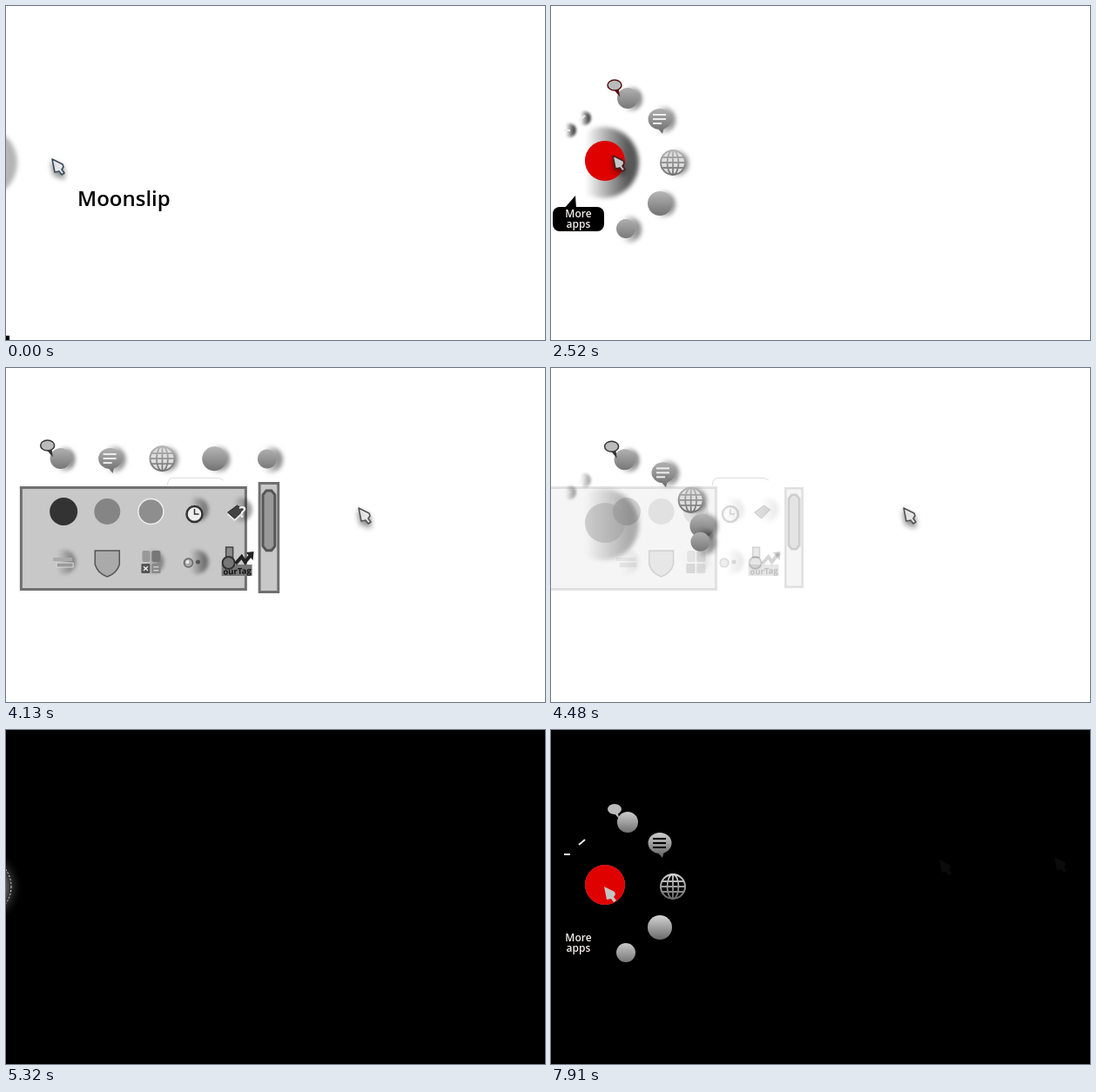
An HTML page with a canvas that plays this animation: 619x384 px, repeating every 8 s.

```html
<!DOCTYPE html>
<html>
<head>
<meta charset="utf-8">
<style>
html, body { margin: 0; width: 100%; height: 100%; overflow: hidden; background: #fff; }
canvas { display: block; }
</style>
</head>
<body>
<canvas id="stage" width="619" height="384"></canvas>
<script>
const ctx = document.getElementById('stage').getContext('2d');
const LOOP = 8000, STEP = 70, TAU = Math.PI * 2;
const FONT = '"Open Sans", sans-serif';

const clamp = v => Math.max(0, Math.min(1, v));
const lerp = (a, b, p) => a + (b - a) * p;
const smooth = p => p * p * (3 - 2 * p);

// Cursor keys: time, x, y
const LIGHT_PATH = [[0, 52, 175], [910, 52, 175], [1190, 14, 180], [1680, 14, 181], [1960, 60, 179],
  [2170, 60, 179], [2380, 70, 171], [2520, 70, 171], [3080, 79, 169], [3290, 79, 169],
  [4060, 376, 163], [4130, 404, 160], [4620, 404, 160], [5110, 505, 170]];
const DARK_PATH = [[6090, 577, 145], [6160, 445, 148], [6230, 340, 168], [6300, 252, 180],
  [6370, 160, 184], [6580, 56, 188], [6860, 30, 189], [7070, 18, 189], [7210, 18, 189], [7910, 60, 179]];

function along(path, t) {
  let i = 1;
  while (i < path.length - 1 && path[i][0] < t) i++;
  const [t0, x0, y0] = path[i - 1], [t1, x1, y1] = path[i];
  const p = clamp((t - t0) / (t1 - t0));
  return [lerp(x0, x1, p), lerp(y0, y1, p)];
}

function at(x, y, alpha, draw, scale = 1) {
  if (alpha <= 0 || scale <= 0) return;
  ctx.save();
  ctx.translate(x, y);
  ctx.scale(scale, scale);
  ctx.globalAlpha *= Math.min(1, alpha);
  draw();
  ctx.restore();
}

function paint(fill, stroke, width = 1) {
  if (fill) { ctx.fillStyle = fill; ctx.fill(); }
  if (stroke) { ctx.strokeStyle = stroke; ctx.lineWidth = width; ctx.stroke(); }
}

function disc(x, y, r, fill, stroke, width) {
  ctx.beginPath();
  ctx.arc(x, y, r, 0, TAU);
  paint(fill, stroke, width);
}

function poly(points, fill, stroke, width, open) {
  ctx.beginPath();
  points.forEach(([x, y]) => ctx.lineTo(x, y));
  if (!open) ctx.closePath();
  paint(fill, stroke, width);
}

function box(x, y, w, h, r, fill, stroke, width) {
  ctx.beginPath();
  ctx.roundRect(x, y, w, h, r);
  paint(fill, stroke, width);
}

function text(str, x, y, font, color, align = 'center') {
  ctx.font = font + ' ' + FONT;
  ctx.fillStyle = color;
  ctx.textAlign = align;
  ctx.fillText(str, x, y);
}

function shade(r, top, bottom) {
  const g = ctx.createLinearGradient(0, -r, 0, r);
  g.addColorStop(0, top);
  g.addColorStop(1, bottom);
  return g;
}

// Blurred disc that fades out towards its left side
function sideShadow(x, y, r, alpha) {
  const g = ctx.createLinearGradient(x - r * 0.5, 0, x + r * 0.7, 0);
  g.addColorStop(0, 'rgba(0,0,0,0)');
  g.addColorStop(1, `rgba(0,0,0,${alpha})`);
  ctx.save();
  ctx.filter = `blur(${Math.min(2.5, r / 6)}px)`;
  disc(x, y, r, g);
  ctx.restore();
}

function wheelIcons(dark, ink) {
  const metal = dark ? shade(15, '#d8d8d8', '#666') : shade(15, '#b8b8b8', '#707070');
  const shadow = r => dark || sideShadow(3, 1, r, 0.45);
  return [
    { x: 88, y: 106, rowX: 53, draw() {
      shadow(14);
      disc(0, 0, 12, metal);
      ctx.beginPath();
      ctx.moveTo(-15, -10);
      ctx.lineTo(-10, -4);
      ctx.lineTo(-11, -11);
      paint(dark ? '#bbb' : ink, dark ? null : ink, 1.5);
      ctx.beginPath();
      ctx.ellipse(-15, -15, 8, 6, 0, 0, TAU);
      paint('#bbb', dark ? null : ink, 1.5);
    } },
    { x: 125, y: 130, rowX: 110, draw() {
      shadow(15);
      ctx.beginPath();
      ctx.ellipse(0, 0, 13.5, 12, 0, 0, TAU);
      paint(metal);
      poly([[-3, 10], [3, 17], [5, 9]], metal);
      ctx.fillStyle = dark ? '#000' : '#eee';
      for (const [y, w] of [[-6, 14], [-1, 14], [4, dark ? 14 : 9]]) ctx.fillRect(-8, y, w + 1, 2);
    } },
    { x: 140, y: 180, rowX: 170, draw() {
      shadow(15);
      disc(0, 0, 14, dark ? null : '#ddd', metal, 2);
      ctx.beginPath();
      ctx.ellipse(0, 0, 6.5, 14, 0, 0, TAU);
      for (const y of [-6, 0, 6]) {
        const half = Math.sqrt(196 - y * y);
        ctx.moveTo(-half, y);
        ctx.lineTo(half, y);
      }
      ctx.moveTo(0, -14);
      ctx.lineTo(0, 14);
      paint(null, metal, 1.8);
    } },
    { x: 125, y: 227, rowX: 230, draw() { shadow(15); disc(0, 0, 14, metal); } },
    { x: 86, y: 256, rowX: 291, draw() { shadow(15); disc(0, 0, 11, metal); } }
  ];
}

const panelIcons = [
  hot => disc(0, 0, 16, hot ? '#6a0c0c' : '#333'),
  () => disc(0, 0, 15, '#858585'),
  () => disc(0, 0, 14.5, '#8e8e8e', '#eee', 1.5),
  () => {
    sideShadow(2, -2, 14, 0.4);
    disc(0, 3, 9, '#eee', '#333', 2.5);
    poly([[0, -3], [0, 3], [5, 3]], null, '#333', 1.5, true);
  },
  () => {
    sideShadow(2, -2, 14, 0.4);
    poly([[-12, 1], [-1, -7], [6, -2], [-4, 8]], '#444', '#222', 1);
    poly([[-12, 3], [-4, 10], [5, 2]], null, '#eee', 1.5, true);
    text('?', 5, 7, 'bold 17px', '#eee');
  },
  () => {
    sideShadow(0, 0, 14, 0.35);
    box(-12, -5, 22, 4, 0, '#aaa');
    box(-8, 1, 19, 5, 0, '#999', '#ddd');
  },
  () => {
    ctx.beginPath();
    ctx.moveTo(-14, -13);
    ctx.lineTo(14, -13);
    ctx.lineTo(14, 3);
    ctx.quadraticCurveTo(11, 13, 0, 17);
    ctx.quadraticCurveTo(-11, 13, -14, 3);
    ctx.closePath();
    paint('#aaa', '#555', 1.5);
  },
  () => {
    sideShadow(2, 0, 13, 0.35);
    box(-10, -13, 9, 13, 2, '#999');
    box(1, -13, 10, 13, 2, '#777');
    box(-11, 2, 10, 11, 1, '#555');
    box(1, 2, 10, 11, 1, '#888');
    text('×', -6, 12, 'bold 13px', '#eee');
    box(3, 5, 6, 1.5, 0, '#ccc');
    box(3, 9, 6, 1.5, 0, '#ccc');
  },
  () => {
    sideShadow(2, 0, 14, 0.45);
    disc(-7, 1, 5, '#aaa', '#666', 1.5);
    disc(4, 0, 2.5, '#555');
    disc(-8, 0, 2, '#eee');
  },
  () => {
    box(-19, 3, 35, 13, 0, '#777');
    poly([[-14, -17], [-6, -17], [-6, -5], [-14, -5]], '#888', '#444', 1.5);
    disc(-11, 1, 7, '#777', '#333', 2);
    poly([[-3, 2], [4, -6], [8, 0], [16, -10]], null, '#222', 4, true);
    poly([[9, -11], [18, -12], [17, -2]], '#222');
    at(-1, 14, 1, () => { ctx.rotate(-0.04); text('ourTag', 0, 0, 'bold 9.5px', '#111'); });
  }
];

function panel(shown, hot) {
  const away = 1 - shown, alpha = 1.3 * shown;
  at(0, 0, alpha, () => {
    box(44.5 - 190 * away, 137.5, 248 + 70 * away, 117, 0, '#c8c8c8', '#707070', 3);
    panelIcons.forEach((draw, i) => {
      const x = lerp(62 + (i % 5) * 52.2, 166, away * 0.28);
      at(x, i < 5 ? 165 : 223, 1, () => draw(hot && i === 0));
    });
    at(306.5 - 32 * away, 195, 1, () => {
      box(-11, -63.5, 22, 127, 0, '#c8c8c8', '#707070', 3);
      poly([[-3, -55], [3, -55], [7, -50], [7, 10], [3, 15], [-3, 15], [-7, 10], [-7, -50]], '#999', '#555', 3);
    }, 1 - 0.12 * away);
  });
}

function wheel(open, shown, slide, hover, dark) {
  const cx = lerp(-28, 60, open), cy = 180, hub = 1 - 1.5 * shown;
  at(0, 0, hub, () => {
    if (!dark) sideShadow(cx, cy, 41, lerp(0.29, 0.66, open));
    else if (open < 1) {
      const g = ctx.createRadialGradient(cx, cy, 24, cx, cy, 48);
      g.addColorStop(0, `rgba(130,130,130,${1 - open})`);
      g.addColorStop(1, 'rgba(0,0,0,0)');
      disc(cx, cy, 48, g);
      ctx.save();
      ctx.globalAlpha *= 1 - open;
      ctx.setLineDash([2, 2]);
      disc(cx, cy, 34, null, '#ddd', 1);
      ctx.restore();
    }
    at(cx + 2, 178, open, () => {
      disc(0, 0, 23, '#999');
      ctx.globalAlpha *= hover;
      disc(0, 0, 23, '#df0000');
    }, open);
    if (!dark) for (const [x, y] of [[38, 129], [21, 143]])
      at(cx + (x - 60) * open, cy + (y - cy) * open, open, () => sideShadow(0, 0, 8, 0.75), open);
    const tools = [[[-45, -37], [-38, -37]], [[-28, -48], [-21, -54]]];
    at(cx, cy, open, () => tools.forEach(line => poly(line, null, '#eee', 2, true)), open);
  });
  const ink = hover > 0.5 && shown < 0.3 ? '#511' : '#333';
  for (const icon of wheelIcons(dark, ink)) {
    const x = cx + (icon.x - 60) * open, y = cy + (icon.y - cy) * open;
    at(lerp(x, icon.rowX, shown) + slide, lerp(y, 104, shown), open, icon.draw, open);
  }
  at(0, 0, hover * hub, () => {
    box(2, 231, 59, 28, 8, '#000');
    poly([[15, 233], [28, 218], [29, 233]], '#000');
    text('More', 31.5, 243, '600 12px', '#f6eeee');
    text('apps', 31.5, 255, '600 12px', '#f6eeee');
  });
}

function cursor(x, y, alpha, fill, line) {
  at(x, y, alpha, () => {
    if (line) {
      ctx.shadowColor = 'rgba(0,0,0,.45)';
      ctx.shadowBlur = 6;
      ctx.shadowOffsetY = 4;
    }
    ctx.lineJoin = 'round';
    poly([[1, 1], [13, 7], [14, 10], [12, 13], [15, 17], [12, 19], [9, 15], [4, 16]], fill, line, 1.6);
  });
}

function render(t) {
  const now = Math.floor(t / STEP) * STEP;
  const seg = (start, steps) => clamp(((now - start) / STEP + 1) / steps);
  const dark = now >= 5320;
  ctx.fillStyle = dark ? '#000' : '#fff';
  ctx.fillRect(0, 0, 619, 384);

  if (dark) {
    wheel(smooth(seg(7210, 11)), 0, 0, seg(7630, 5), true);
    if (now >= 6160) cursor(577, 145, 0.055, '#ccc');
    if (now >= 6230) cursor(445, 148, 0.055, '#ccc');
    if (now >= 6090) cursor(...along(DARK_PATH, now), 1, '#c4c4c4');
    return;
  }

  at(0, 0, t < 500 ? 1 : t < 560 ? 0.4 : 0, () => {
    text('Moonslip', 82, 230, '600 24px', '#000', 'left');
    ctx.fillRect(0, 379, 4, 5);
  });

  const rise = clamp((now - 2520) / 560), fall = seg(4130, 7);
  const row = smooth(rise) * (1 - fall ** 3);
  const slide = 85 * Math.sin(Math.PI * rise) + 22 * Math.sin(Math.PI * fall);
  const shown = smooth(rise) * (1 - fall);
  const open = smooth(seg(980, 10)) * (1 - smooth(seg(4690, 8)));
  const hover = now < 4130 ? seg(1750, 4) : 0;
  const hot = now >= 3010 && now < 3360;

  panel(shown, hot);
  wheel(open, row, slide, hover, false);
  if (hot) {
    box(30, 124, 64, 16, 8, '#000');
    text('Early Elfie', 62, 136, '600 11.5px', '#fff');
  }
  if (now >= 3710 && now < 4550) {
    ctx.beginPath();
    ctx.moveTo(185.5, 135);
    ctx.quadraticCurveTo(185.5, 126.5, 192, 126.5);
    ctx.lineTo(245, 126.5);
    ctx.lineTo(250, 129);
    paint(null, '#ddd');
  }

  const onHub = now >= 1960 && now <= 2590;
  const line = now < 1960 ? '#3c4a5c' : onHub ? '#4a2020' : '#555';
  cursor(...along(LIGHT_PATH, now), 1 - seg(4760, 6), onHub ? '#ddd' : '#fff', line);
}

function tick() {
  render(performance.now() % LOOP);
  requestAnimationFrame(tick);
}
tick();
</script>
</body>
</html>
```
